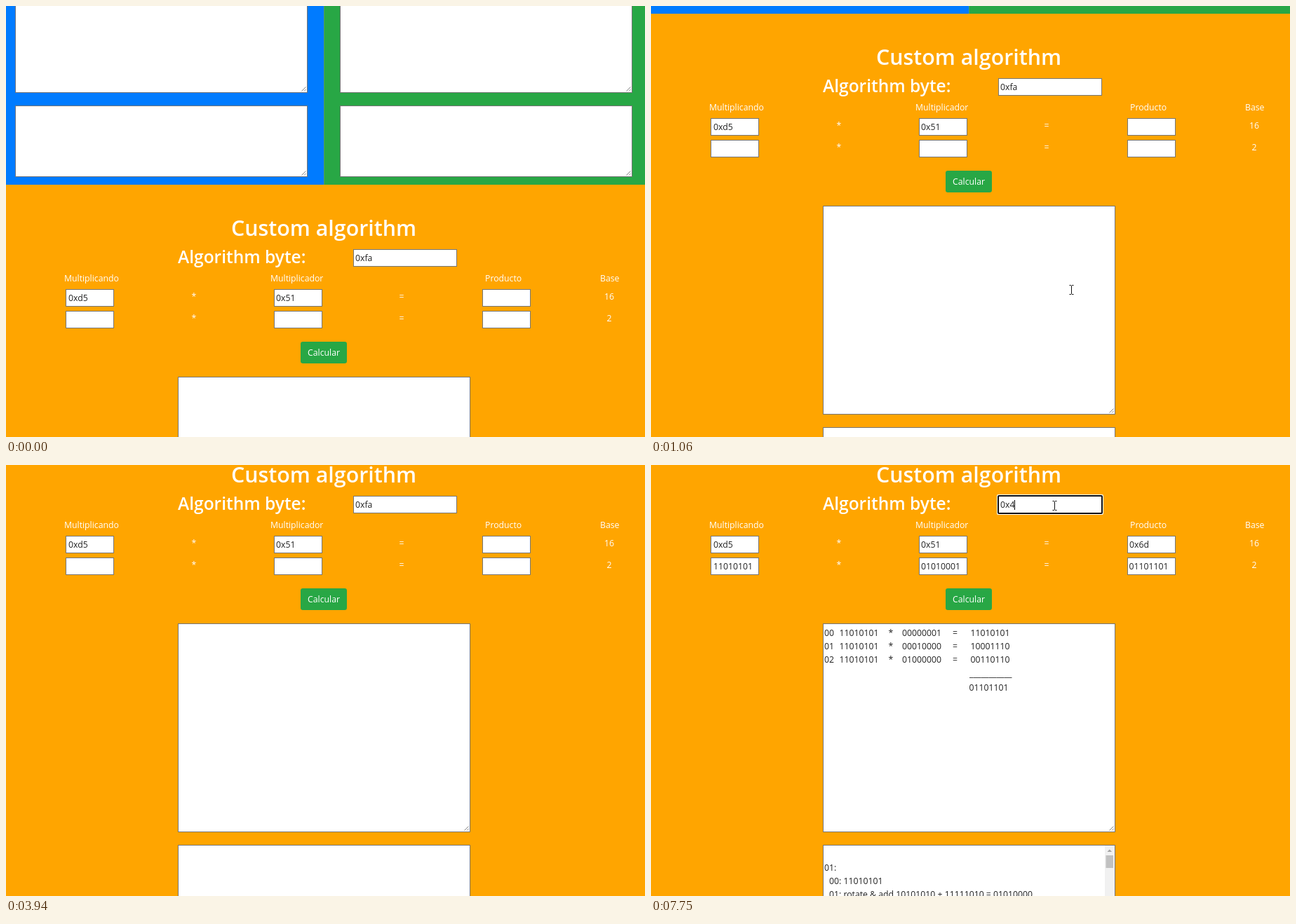
Animation, 911 px wide and 615 px high, one loop 8 s. Source, as an HTML page:

```html
<!DOCTYPE html>
<html lang="es">
<head>
<meta charset="utf-8">
<title>Custom algorithm</title>
<style>
html, body { margin: 0; width: 100%; height: 100%; overflow: hidden; background: #ffa500; }
svg { display: block; font: 12.25px "Open Sans", "Noto Sans", sans-serif; }
text { white-space: pre; }
.w { fill: #fff; }
.k { fill: #222; }
.m { text-anchor: middle; }
.h { fill: #fff; font-weight: 600; }
.cursor { display: none; }
</style>
</head>
<body>
<svg id="stage" width="911" height="615" viewBox="0 0 911 615"></svg>
<script>
const LOOP = 8000;
const stage = document.getElementById('stage');

// Markup helpers; y is measured on the page at scroll offset 0.
const rect = (x, y, w, h, fill, extra = '') =>
  `<rect x="${x}" y="${y}" width="${w}" height="${h}" fill="${fill}" ${extra}/>`;
const text = (x, y, s, cls, extra = '') =>
  `<text x="${x}" y="${y}" class="${cls}" ${extra}>${s}</text>`;
const box = (x, y, w, h) =>
  rect(x + .5, y + .5, w - 1, h - 1, '#fff', 'stroke="#767676"');
const area = (x, y, h) => box(x, y, 417, h) +
  `<path d="M${x + 408.5} ${y + h - 2.5}l6-6m-2.5 6l2.5-2.5" stroke="#777" stroke-width=".9" fill="none"/>`;

const fieldX = [85, 382, 679];
const rowY = [101, 132];
const fields = rowY.flatMap(y => fieldX.map(x => [x, y, 69, 25]));
const byteField = [495, 44, 148, 25];
const textZones = [...fields, byteField, [320, 0, 266, 32], [245, 226, 417, 298], [245, 542, 417, 102]];
const button = [420, 176, 66, 31];

const panels = rect(0, -600, 453.5, 552, '#007bff') + rect(453.5, -600, 457.5, 552, '#28a745') +
  [13, 476].map(x => area(x, -477, 298) + area(x, -161, 102)).join('');

const labels = [[83, 'Multiplicando'], [377, 'Multiplicador'], [683, 'Producto'], [847, 'Base']]
  .map(([x, s]) => text(x, 89.5, s, 'w')).join('');

const rows = rowY.map((y, i) =>
  text(268, y + 15, '*', 'w m') + text(564, y + 14.5, '=', 'w m') +
  text(860, y + 14.5, i ? '2' : '16', 'w m')).join('');

const steps = [['00000001', '11010101'], ['00010000', '10001110'], ['01000000', '00110110']]
  .map(([bit, res], i) => {
    const cells = [[247, '0' + i], [268.5, '11010101'], [338.5, '*'], [358, bit], [430, '='], [455.5, res]];
    return cells.map(([x, s]) => text(x, 243.5 + i * 19.4, s, 'k')).join('');
  }).join('');

const results =
  text(682, 118, '0x6d', 'k') + text(89, 149, '11010101', 'k') +
  text(385, 149, '01010001', 'k') + text(681.5, 149, '01101101', 'k') +
  steps + text(454, 301.5, '_'.repeat(11), 'k') + text(453.5, 321.5, '01101101', 'k') +
  text(247, 578.5, '01:', 'k') + text(254, 598, '00: 11010101', 'k') +
  text(254, 617.2, '01: rotate &amp; add 10101010 + 11111010 = 01010000', 'k') +
  rect(647, 543, 14, 100, '#f1f1f1') + rect(648.5, 557, 10.5, 18, '#c1c1c1') +
  '<path d="M650.5 552l3.3-3.6 3.3 3.6z" fill="#a3a3a3"/>';

stage.innerHTML = rect(0, 0, 911, 615, '#ffa500') +
  '<g id="page">' + panels +
  text(453, 25, 'Custom algorithm', 'h m', 'font-size="30.4"') +
  text(245, 63.5, 'Algorithm byte:', 'h', 'font-size="24.5"') +
  box(...byteField) +
  '<g id="focus">' + rect(493, 42, 152, 29, '#fff', 'rx="2"') +
  rect(494, 43, 150, 27, '#101010', 'rx="2"') + rect(496, 45, 146, 23, '#fff') + '</g>' +
  text(498, 61, '0xfa', 'k', 'id="byte"') + rect(0, 50, 1, 14, '#000', 'id="caret"') +
  labels + fields.map(f => box(...f)).join('') + rows +
  text(89, 118, '0xd5', 'k') + text(385, 118, '0x51', 'k') +
  rect(...button, '#28a745', 'rx="3.2" id="button"') + text(453, 196, 'Calcular', 'w m') +
  area(245, 226, 298) + area(245, 542, 102) +
  '<g id="results">' + results + '</g></g>' +
  `<g class="cursor" id="arrow"><path d="M0 0v13l3-2.8 2.2 5 2.2-1-2.2-4.7h4z" fill="#fff" stroke="#000" stroke-width=".9"/></g>
   <g class="cursor" id="beam"><path d="M-3 -6.5h2.2l.8.8.8-.8h2.2M0-5.7v11.4M-3 6.5h2.2l.8-.8.8.8h2.2" fill="none" stroke="#111"/></g>
   <g class="cursor" id="hand"><path d="M-1.3 1.3a1.3 1.3 0 0 1 2.6 0V6.6l5.5 1.2q1.8.4 1.7 2.2l-.5 4-1 3.2H-.5L-2 14.5-5 10.4q-.3-1.7 1.4-1.4L-1.3 10.6z" fill="#fff" stroke="#000" stroke-width=".9" stroke-linejoin="round"/></g>`;

const $ = id => document.getElementById(id);
const show = (el, on) => { el.style.display = on ? 'inline' : 'none'; };

// [time, value] lists that hold each value until the next.
const scroll = [[0, 303], [910, 232], [990, 130], [1060, 59], [1460, 38], [1530, -6], [1610, -22],
  [2160, -36], [2230, -58], [2310, -73], [2390, -79], [2460, -81], [3160, -58], [3230, -14],
  [3310, -2], [3940, 0]];
const typed = [[0, '0xfa'], [7280, '0xf'], [7670, '0x'], [7750, '0x4']];
const held = (list, t) => list.filter(k => k[0] <= t).pop()[1];

// Pointer way points: [time, x, y], eased in between.
const path = [[0, 430, 420], [140, 430, 420], [830, 598, 406], [1059, 598, 406], [1060, 599.5, 405],
  [2079, 599.5, 405], [2080, 599.5, 399.5], [4020, 599.5, 399.5], [4710, 471, 188], [5260, 471, 188],
  [5570, 545, 16], [5650, 545, 16], [6200, 548, 57], [6499, 548, 57], [6500, 574.5, 58],
  [6739, 574.5, 58], [6740, 575.5, 58], [LOOP, 575.5, 58]];

function pointer(t) {
  const i = path.findIndex(k => k[0] > t);
  const [t0, x0, y0] = path[i - 1], [t1, x1, y1] = path[i];
  const u = (t - t0) / (t1 - t0), e = u * u * (3 - 2 * u);
  return [x0 + (x1 - x0) * e, y0 + (y1 - y0) * e];
}

const inside = (x, y, [bx, by, w, h]) => x >= bx && x < bx + w && y >= by && y < by + h;

function draw(t) {
  const dy = held(scroll, t);
  $('page').setAttribute('transform', `translate(0 ${dy})`);

  const [x, y] = pointer(t);
  const visible = t >= 140 && !(t >= 3940 && t < 4020);
  const hover = visible && inside(x, y - dy, button);
  const kind = hover ? 'hand' : textZones.some(z => inside(x, y - dy, z)) ? 'beam' : 'arrow';
  for (const id of ['arrow', 'beam', 'hand']) show($(id), visible && id === kind);
  $(kind).setAttribute('transform', `translate(${x} ${y})`);
  $('button').setAttribute('fill', hover ? '#218838' : '#28a745');

  show($('results'), t >= 5180);
  const focused = t >= 6350;
  show($('focus'), focused);
  show($('caret'), focused);
  $('byte').textContent = held(typed, t);
  $('caret').setAttribute('x', Math.round(498 + $('byte').getComputedTextLength()));
}

const start = performance.now();
function tick() {
  draw((performance.now() - start) % LOOP);
  requestAnimationFrame(tick);
}
tick();
</script>
</body>
</html>
```
